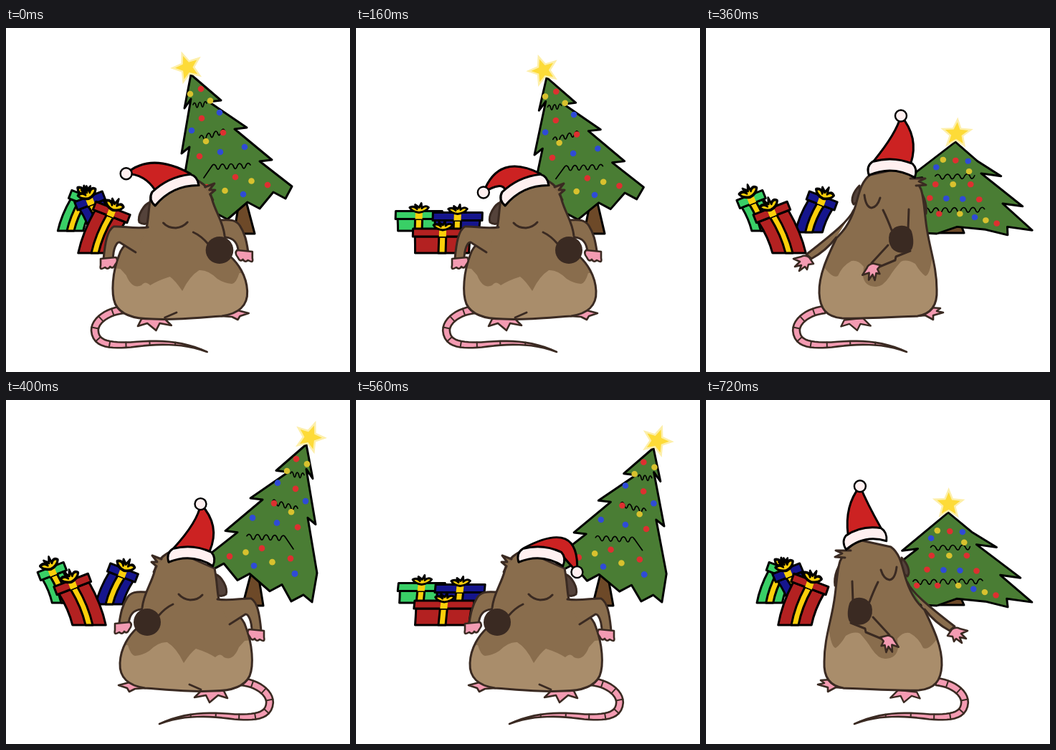
Animation of 480x480 px, one loop 800 ms. Source, as an HTML page:

```html
<!DOCTYPE html>
<html lang="en">
<head>
<meta charset="utf-8">
<title>Holiday dance</title>
<style>
html, body { margin: 0; width: 100%; height: 100%; overflow: hidden; background: #fff; }
svg { display: block; width: 100vw; height: 100vh; }
path, circle { stroke-linejoin: round; stroke-linecap: round; }
.k { stroke: #000; stroke-width: 3; }
.thin { stroke: #000; stroke-width: 1.7; fill: none; }
.rat { stroke: #3a2a22; stroke-width: 3; }
.line { stroke: #3a2a22; stroke-width: 3; fill: none; }
.ring { stroke: #3a2a22; stroke-width: 2; fill: none; }
.fur { fill: #896d4d; }
.pale { fill: #a98d6b; }
.pink { fill: #f39bb2; stroke-width: 2.6; }
.dark { fill: #3a2a22; }
.ear { fill: #54423a; }
</style>
</head>
<body>
<svg viewBox="0 0 480 480">
  <g id="tree"></g>
  <g id="gifts"></g>
  <g id="rat"></g>
  <g id="hat">
    <path id="cone" class="k" fill="#cc2222"/>
    <path id="brim" class="k" fill="#fff0f0" d="M-32 13Q-37 1 -28 -6Q0 -16 28 -6Q36 1 32 13Q0 -3 -32 13Z"/>
    <circle id="pom" class="k" r="8" fill="#fff0f0" style="stroke-width:2.4"/>
  </g>
</svg>
<script>
const $ = id => document.getElementById(id);
const lerp = (a, b, u) => a + (b - a) * u;
const mix = (p, q, u) => p.map((v, i) => lerp(v, q[i], u));
const path = (cls, d, fill) => `<path class="${cls}" d="${d}"${fill ? ` fill="${fill}"` : ''}/>`;
const poly = pts => 'M' + pts.join('L') + 'Z';
const group = (html, at) => `<g transform="${at}">${html}</g>`;

// Tree

function star(x, y, tilt) {
  const shape = (R, r) => poly(Array.from({ length: 10 }, (_, i) => {
    const a = tilt + i * Math.PI / 5, q = i % 2 ? r : R;
    return [x + q * Math.sin(a), y - q * Math.cos(a)];
  }));
  return path('', shape(24, 10.5), '#fdefaa') + path('', shape(17, 7.5), '#fddb38');
}

// Branch tips, each followed by a cut at a fixed offset
const branches = (tips, dx, dy) =>
  tips.flatMap((p, i) => i < tips.length - 1 ? [p, [p[0] + dx, p[1] + dy]] : [p]);

// Evenly spaced lights between two points, one per colour letter
const COLORS = { R: '#dd3030', Y: '#d8c12e', B: '#2f4bd6' };
const lights = (names, from, to) => [...names].map((n, i) => {
  const [x, y] = mix(from, to, i / (names.length - 1));
  return `<circle cx="${x}" cy="${y}" r="4.3" fill="${COLORS[n]}"/>`;
}).join('');

function garland(from, to, waves) {
  let d = 'M' + from;
  for (let i = 0; i < waves; i++) {
    const [cx, cy] = mix(from, to, (i + 0.5) / waves);
    d += `Q${cx} ${cy + (i % 2 ? 9 : -5)} ${mix(from, to, (i + 1) / waves)}`;
  }
  return path('thin', d);
}

const tall =
  path('k', poly([[326, 238], [334, 238], [347, 287], [318, 287]]), '#6d4928') +
  path('k', poly([
    [258, 65],
    ...branches([[300, 101], [336, 139], [371, 184], [399, 221]], -17, 2),
    ...branches([[390, 238], [354, 252], [309, 267], [279, 281], [250, 282]], -17, -9),
    ...branches([[243, 242], [245, 175], [249, 112]], 13, -76)
  ]), '#4a7d34') +
  garland([261, 107], [280, 105], 5) + garland([270, 153], [305, 143], 7) +
  path('thin', 'M276 209L287 193') + garland([287, 193], [341, 191], 9) +
  lights('RYB', [272, 85], [298, 118]) + lights('RRB', [273, 126], [333, 166]) +
  lights('BYB', [259, 143], [299, 173]) + lights('YR', [257, 92], [270, 179]) +
  lights('RYR', [320, 208], [365, 219]) + lights('RYB', [280, 222], [331, 232]) +
  lights('BB', [274, 243], [274, 243]) +
  star(253, 55, -0.36);

const squat =
  path('k', poly([[322, 286], [329, 277], [356, 276], [360, 286]]), '#6d4928') +
  path('k', poly([
    [342, 153], [374, 181],
    ...branches([[408, 203], [440, 247], [455, 282]], -28, -4),
    [420, 277], [421, 289], [390, 281], [350, 277], [322, 287], [228, 282],
    ...branches([[244, 247], [276, 208]], 54, -42)
  ]), '#4a7d34') +
  garland([316, 203], [371, 202], 8) + garland([290, 252], [387, 251], 15) +
  lights('YRB', [326, 179], [361, 181]) + lights('BY', [317, 190], [363, 196]) +
  lights('RYR', [317, 215], [366, 215]) + lights('RBBR', [310, 235], [379, 237]) +
  lights('RRY', [295, 258], [353, 258]) + lights('BYR', [374, 263], [405, 272]) +
  star(343, 141, 0.03);

// Presents: flat when side is 0, stretched and bent when it is -1 or 1

const bow = 'M0 2Q-10 1 -14 -5Q-7 -8 -3 -3L-6 -9L0 -5L3 -11L4 -4Q9 -9 14 -5Q10 1 0 2Z';

function box(color, x, y, width, height, side) {
  const bent = side !== 0;
  const mid = x + 4 * side, half = width * (bent ? 0.31 : 0.5);
  const rise = height * (bent ? 2 : 1);
  const lidHalf = bent ? width * 0.34 : width / 2 + 4, lidTall = bent ? 6 : 5.5;
  const a = side * 21 * Math.PI / 180, c = Math.cos(a), s = Math.sin(a);
  const cx = mid + 0.31 * width * side, cy = y - rise;
  const at = (u, v) => [cx + u * c - v * s, cy + u * s + v * c];
  const strip = (top, base, fill) => {
    const edge = k => {
      const p = at(k * top, lidTall), q = [mid + k * base, y];
      return [p, [lerp(q[0], p[0], 0.28), (p[1] + y) / 2], q];
    };
    const [l, lc, lb] = edge(-1), [r, rc, rb] = edge(1);
    return path('k', `M${l}Q${lc} ${lb}L${rb}Q${rc} ${r}Z`, fill);
  };
  const lid = h => poly([at(-h, -lidTall), at(h, -lidTall), at(h, lidTall), at(-h, lidTall)]);
  return strip(lidHalf - 3, half, color) + strip(5, 5, '#fccf0a') +
    path('k', lid(lidHalf), color) + path('', lid(5), '#fccf0a') +
    group(path('k', bow, '#fccf0a'),
      `translate(${at(0, -lidTall)}) rotate(${side * 21}) scale(.95 ${bent ? 1.3 : 1})`);
}

const pile = side =>
  box('#39cf66', 86, 283, 57, 22, side) +
  box('#15158d', 140, 285, 61, 22, -side) +
  box('#b32121', 120, 314, 75, 28.5, side);
const gifts = { right: pile(1), flat: pile(0), left: pile(-1) };

// Rat

function makeTail() {
  const bends = [
    [[166, 393], [144, 395], [126, 408], [126, 422]],
    [[126, 422], [127, 443], [150, 443], [175, 442]],
    [[175, 442], [210, 438], [245, 437], [280, 452]]
  ];
  const left = [], right = [];
  let rings = '';
  for (let i = 0; i <= 36; i++) {
    const n = Math.min(2, Math.floor(i / 12)), u = i / 12 - n;
    const [a, b, c, d] = bends[n];
    const ab = mix(a, b, u), bc = mix(b, c, u), cd = mix(c, d, u);
    const p = mix(ab, bc, u), q = mix(bc, cd, u), o = mix(p, q, u);
    const len = Math.hypot(q[0] - p[0], q[1] - p[1]);
    const w = 5 * (1 - (i / 36) ** 3) / len;
    const nx = (p[1] - q[1]) * w, ny = (q[0] - p[0]) * w;
    left.push([o[0] + nx, o[1] + ny]);
    right.unshift([o[0] - nx, o[1] - ny]);
    if (i % 4 === 3) rings += `M${left[i]}L${right[0]}`;
  }
  return path('rat pink', poly([...left, ...right])) + path('ring', rings);
}

const tail = makeTail();
const foot = path('rat pink', 'M-19 -5L-24 5L-11 1L1 11L6 1L22 4L10 -8Z');
const mitt = path('rat pink', 'M-11 -6L10 -8Q14 -4 9 2Q6 9 2 5Q-1 10 -5 6Q-13 11 -11 3Z');
const splay = path('rat pink', 'M8 -7Q2 -11 -3 -8L-14 -5L-5 -1L-12 6L-3 4L-6 12L2 6L5 10L7 3L14 2Z');

function torso(id, outline, patch) {
  return `<clipPath id="${id}"><path d="${outline}"/></clipPath>` +
    path('pale', outline) +
    `<path class="fur" clip-path="url(#${id})" d="${patch}"/>` +
    path('line', outline);
}

const crouch = tail +
  group(foot, 'translate(209 411)') +
  path('rat pink', 'M299 402L314 403L322 407L325 402L337 398L322 394Z') +
  path('rat ear', 'M202 243C193 246 184 262 187 271Q194 276 201 271Z') +
  path('rat fur', 'M299 268C312 267 320 268 325 276C332 287 334 298 336 311L323 313C322 300 317 293 305 292') +
  group(mitt, 'translate(331 318) scale(-1 1)') +
  torso('crouchClip',
    'M203 235C199 255 200 265 197 278C178 290 163 305 160 315C150 340 148 370 154 385C162 402 185 406 205 406C235 408 270 404 300 402C322 399 336 388 335 367C334 345 322 328 311 318L304 290C302 270 292 258 287 240C284 225 275 215 260 210Z',
    'M100 190H360V342H324Q320 356 314 357Q303 356 294 350Q281 337 269 338Q256 346 246 367Q236 352 229 347Q213 352 202 359Q195 352 190 359Q177 365 169 345L161 336L100 330Z') +
  path('rat fur', 'M199 278C180 281 165 276 152 277C143 282 140 300 138 322L151 323C151 308 156 298 160 299L182 313') +
  group(mitt, 'translate(145 328)') +
  path('rat fur', 'M277 222L290 217L283 226L291 226L284 232L288 240') +
  path('line', 'M220 272Q226 279 237 279Q247 278 253 271M261 285Q272 290 282 302M222 404L238 397') +
  '<circle class="dark" cx="297" cy="310" r="19"/>';

const stand = tail +
  group(foot, 'translate(210 412) scale(.9)') +
  path('rat pink', 'M294 402L306 401L317 407L317 401L331 397L322 395L327 391L312 390Z') +
  path('rat ear', 'M214 220C206 228 201 240 206 246L216 240Z') +
  path('rat ear', 'M294 222C303 230 309 246 307 259L299 258Z') +
  torso('standClip',
    'M229 205C215 215 213 235 208 250C200 275 190 285 182 293C170 318 157 345 158 370C159 392 168 403 190 405C220 406 270 403 295 402C315 399 323 385 322 365C322 335 313 310 309 285C305 265 305 240 300 225C294 212 285 200 270 196Z',
    'M100 180H350V318H316Q312 346 306 346Q299 341 292 329Q280 322 272 326Q262 337 256 347Q246 362 236 361Q221 360 219 346L220 333Q212 323 203 325Q190 332 184 346Q176 350 163 331L100 330Z') +
  path('rat fur', 'M206 254C200 268 180 285 140 316L147 322C160 315 172 305 182 292') +
  group(splay, 'translate(136 327)') +
  path('line', 'M254 303L231 328M285 311L265 319L264 324L240 334') +
  group(splay, 'translate(232 339) rotate(-42)') +
  path('rat fur', 'M285 210L306 210L297 214L307 219L293 220') +
  path('line', 'M221 233Q223 250 231 251Q239 250 243 237M247 254Q253 266 259 282M283 253L282 280') +
  path('dark', 'M256 287C262 273 282 272 287 284C290 294 290 303 287 309C277 316 266 315 259 307Q253 298 256 287Z');

// Dance: brim is x, y, angle, width; flip is the sum of mirrored x positions

const beats = [
  { body: 'crouch', flip: 0, brim: [233, 222, -25, 1.05] },
  { body: 'stand', flip: 0, brim: [260, 194, 3, 1] },
  { body: 'crouch', flip: 494, brim: [259, 216, 5, 0.97] },
  { body: 'stand', flip: 487, brim: [221, 190, -12, 0.9] }
];

// Hat tip: time, angle from upright, length, sideways bend of the middle
const swing = [
  [0, -74, 68, -35], [120, -115, 57, -45], [240, -63, 53, -4], [320, 9, 73, 18],
  [400, 10, 72, 25], [560, 116, 55, 41], [640, 35, 54, -9], [720, -5, 70, -12]
];
swing.push([800, ...swing[0].slice(1)]);

function drawHat(t, [x, y, tilt, width]) {
  const i = swing.findIndex(k => k[0] > t), from = swing[i - 1], to = swing[i];
  const [, deg, len, bend] = mix(from, to, (t - from[0]) / (to[0] - from[0]));
  const a = deg * Math.PI / 180, sin = Math.sin(a), cos = Math.cos(a);
  const tip = [len * sin, -len * cos];
  const fat = 16 + Math.max(0, tip[1]) * 0.55, rise = 0.2 * tip[1] - 30;
  const bendAt = k => [bend + k * fat * cos, rise + k * fat * sin];
  const r = tilt * Math.PI / 180;
  const base = k => [k * 26 * width * Math.cos(r), k * 26 * width * Math.sin(r) - 7];
  $('hat').setAttribute('transform', `translate(${x} ${y})`);
  $('cone').setAttribute('d',
    `M${base(-1)}Q${bendAt(-1)} ${tip}Q${bendAt(1)} ${base(1)}Z`);
  $('brim').setAttribute('transform', `rotate(${tilt}) scale(${width} 1)`);
  $('pom').setAttribute('transform', `translate(${tip})`);
}

// Moves whatever is h above the ground by dx, dy, and the rest in proportion
const lean = (dx, dy, h, ground) =>
  `matrix(1 0 ${-dx / h} ${1 - dy / h} ${ground * dx / h} ${ground * dy / h})`;
const mirror = sum => sum ? `translate(${sum} 0) scale(-1 1)` : '';

function variants(host, set) {
  $(host).innerHTML = Object.keys(set).map(k => `<g id="${k}">${set[k]}</g>`).join('');
  return (name, transform) => Object.keys(set).forEach(k => {
    $(k).style.display = k === name ? '' : 'none';
    $(k).setAttribute('transform', transform);
  });
}
const showTree = variants('tree', { tall, squat });
const showGifts = variants('gifts', gifts);
const showRat = variants('rat', { crouch, stand });

function treePose(t) {
  const u = t % 200 / 160, back = t >= 400;
  if (t % 400 < 200) {
    const move = back ? lean(-4 * u, 5 * u - 3, 222, 287) : lean(8 * u, 4 * u, 222, 287);
    return showTree('tall', move + mirror(back ? 677 : 0));
  }
  const d = 8 * u - 2;
  showTree('squat', lean(back ? -d : d, d, 134, 287));
}

function giftPose(t) {
  const i = Math.floor(t / 160), u = t % 160 / 160, drift = 4 * u - 2;
  const name = ['right', 'flat', 'left', 'flat', 'right'][i];
  const dx = [-5 * u, -drift, drift, 6 + drift, -5 * u][i];
  showGifts(name, lean(dx, 0, 60, 314));
}

function draw(ms) {
  let t = Math.floor(ms % 800 / 40) * 40;
  if (t === 280 || t === 760) t -= 40; // two poses are held twice as long
  const beat = beats[Math.floor(t / 200)];
  const wide = 1 + 0.018 * Math.max(0, 1 - t / 120);
  treePose(t);
  giftPose(t);
  showRat(beat.body, `translate(243 0) scale(${wide} 1) translate(-243 0)` + mirror(beat.flip));
  drawHat(t, beat.brim);
}

let start;
function tick(now) {
  start ??= now;
  draw(now - start);
  requestAnimationFrame(tick);
}
draw(0);
requestAnimationFrame(tick);
</script>
</body>
</html>
```
